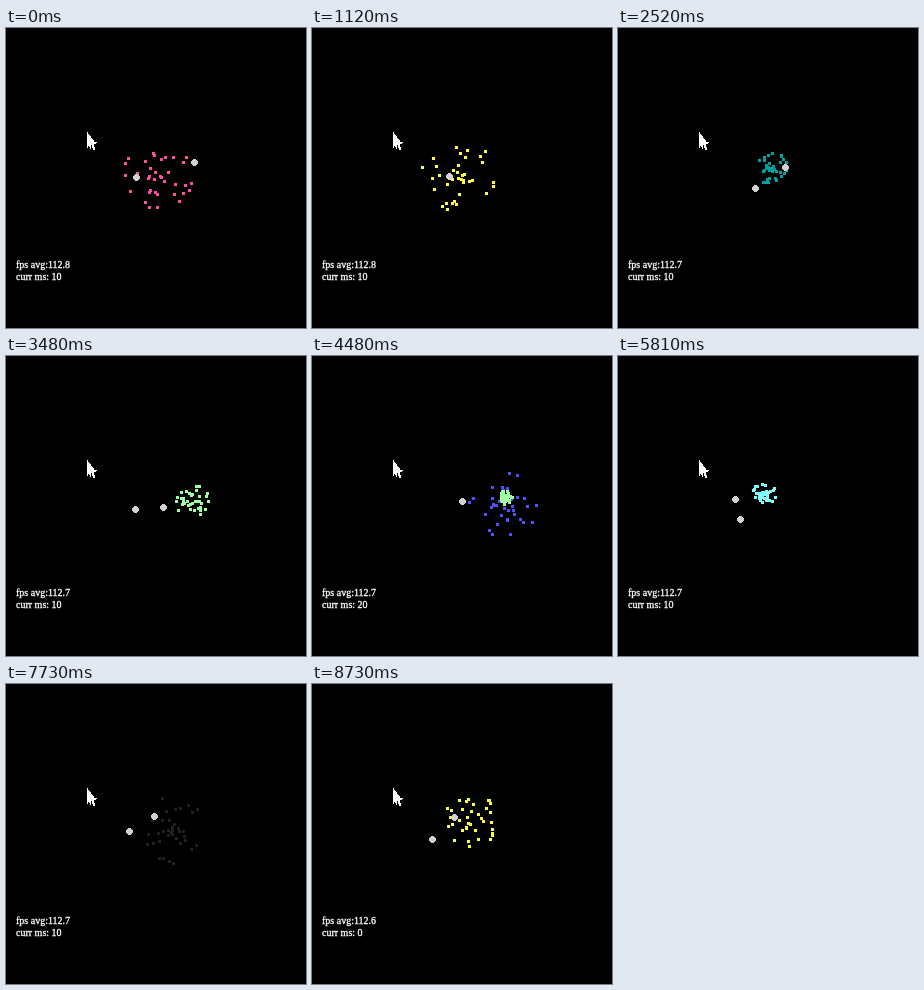
Animation, 300 px wide and 300 px high, one loop 8760 ms. Source, as an HTML page:

```html
<!DOCTYPE html>
<html lang="en">
<head>
<meta charset="utf-8">
<title>Rockets</title>
<style>
  html, body { margin: 0; width: 100%; height: 100%; overflow: hidden; background: #000; }
  svg { display: block; width: 100vw; height: 100vh; }
  text { font: 10px "Liberation Serif", "Times New Roman", serif; fill: #fff; stroke: #fff; stroke-width: 0.3px; }
  path { fill: none; stroke-width: 3.3; stroke-linecap: round; }
</style>
</head>
<body>
<svg viewBox="0 0 300 300">
  <g id="bursts" shape-rendering="crispEdges"></g>
  <g id="balls" fill="#d2d2d2" shape-rendering="crispEdges"></g>
  <polygon fill="#fff" shape-rendering="crispEdges" points="81,104 82,104 83,107 84,106 85,110 86,109 87,112 88,111 88,114 91,114 91,115 88,116 89,121 88,123 87,122 86,117 85,117 85,121 84,121 83,117 81,121"/>
  <text id="fps" x="10" y="240"></text>
  <text id="ms" x="10" y="252"></text>
</svg>
<script>
const LOOP = 8760, STEP = 40, LIFE = 640, SPEED = 0.062, SPARKS = 36;
const GOLDEN_ANGLE = Math.PI * (3 - Math.sqrt(5));

// launch time, start x, y, burst time, burst x, y, colour
const rockets = [
  [-900, 116, 150, -580, 151, 149, '#ff50a0'],
  [0, 188, 134, 200, 212, 138, '#a0ffa0'],
  [0, 130, 149, 510, 146, 149, '#ffff40'],
  [910, 115, 151, 1480, 175, 143, '#ff8040'],
  [1700, 115, 158, 2250, 153, 140, '#00a0a0'],
  [2072, 118, 129, 2840, 202, 146, '#ff50a0'],
  [2250, 117, 166, 3200, 186, 145, '#a0ffa0'],
  [3000, 116, 150, 3900, 192, 151, '#5050ff'],
  [3300, 116, 155, 4360, 193, 142, '#a0ffa0'],
  [3920, 116, 141, 5020, 183, 149, '#ffff40'],
  [4980, 115, 152, 5600, 145, 137, '#80ffff'],
  [5760, 115, 143, 6300, 147, 146, '#5050ff'],
  [5660, 115, 166, 6900, 180, 139, '#00a0a0'],
  [6400, 116, 148, 7170, 166, 146, '#202020'],
  [7510, 115, 132, 7960, 185, 132, '#ff50a0'],
  [7590, 115, 150, 8280, 160, 136, '#ffff40'],
  [8300, 116, 138, LOOP, 144, 132, '#fff'],
  [8650, 116, 155, LOOP, 122, 155, '#fff']
];

const byId = id => document.getElementById(id);

// Centre of the pixel that holds a coordinate
const pixel = v => Math.floor(v + 0.5) + 0.5;

function add(parent, tag, attrs) {
  const node = document.createElementNS('http://www.w3.org/2000/svg', tag);
  for (const key in attrs) node.setAttribute(key, attrs[key]);
  return byId(parent).appendChild(node);
}

function randomizer(seed) {
  return () => (seed = (seed * 16807) % 2147483647) / 2147483647;
}

const shows = rockets.map(([launch, x0, y0, burst, x1, y1, colour], i) => {
  const random = randomizer(7919 * (i + 3));
  const sparks = Array.from({ length: SPARKS }, (_, k) => {
    const angle = k * GOLDEN_ANGLE + random();
    const reach = Math.pow(random(), 0.8);
    return [Math.cos(angle) * reach, Math.sin(angle) * reach];
  });
  const ball = add('balls', 'circle', { r: 3.3 });
  const cloud = add('bursts', 'path', { stroke: colour });
  return { launch, x0, y0, burst, x1, y1, sparks, ball, cloud };
});

function show(node, visible) {
  node.setAttribute('display', visible ? 'inline' : 'none');
  return visible;
}

function drawRocket(r, t) {
  if (show(r.ball, t >= r.launch && t < r.burst)) {
    const p = (t - r.launch) / (r.burst - r.launch);
    r.ball.setAttribute('cx', pixel(r.x0 + (r.x1 - r.x0) * p));
    r.ball.setAttribute('cy', pixel(r.y0 + (r.y1 - r.y0) * p));
  }
  const age = t - r.burst;
  if (show(r.cloud, age >= 0 && age < LIFE)) {
    const radius = age * SPEED;
    r.cloud.setAttribute('d', r.sparks.map(([dx, dy]) =>
      `M${pixel(r.x1 + dx * radius)} ${pixel(r.y1 + dy * radius)}h0`).join(''));
  }
}

function draw(time) {
  const step = Math.floor((time % LOOP) / STEP);
  const t = step * STEP;
  shows.forEach(r => drawRocket(r, t));
  const fps = t < 1800 ? 112.8 : t < 8000 ? 112.7 : 112.6;
  const ms = step % 15 === 7 ? 20 : step % 15 === 8 ? 0 : 10;
  byId('fps').textContent = `fps avg:${fps}`;
  byId('ms').textContent = `curr ms: ${ms}`;
}

const start = performance.now();
function tick() {
  draw(performance.now() - start);
  requestAnimationFrame(tick);
}
tick();
</script>
</body>
</html>
```
